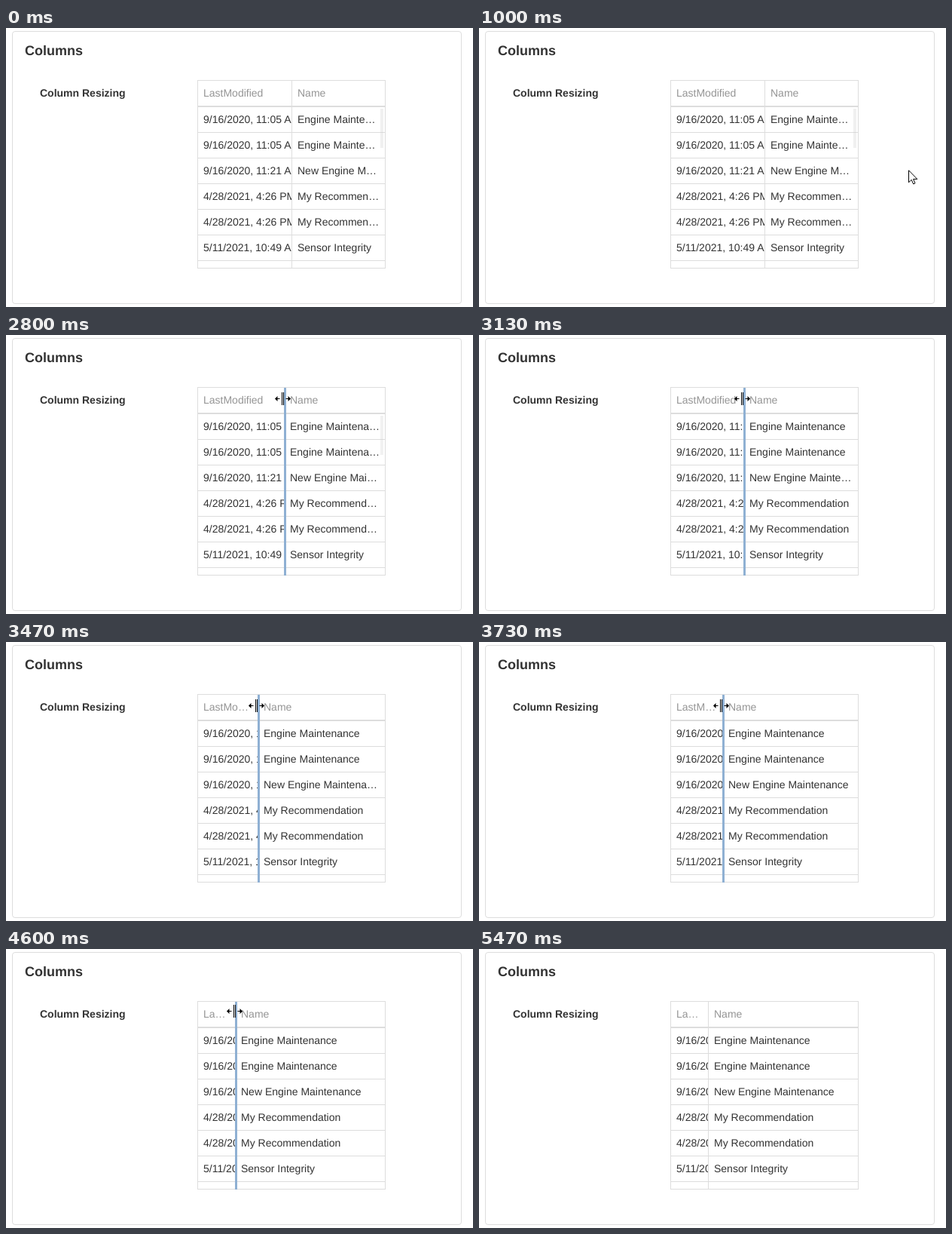
These frames come from a looping animation (620 px wide and 370 px high, 5790 ms). An HTML page:

```html
<!DOCTYPE html>
<html lang="en">
<head>
<meta charset="utf-8">
<title>Column Resizing</title>
<style>
html, body { margin: 0; width: 100%; height: 100%; overflow: hidden; background: #fff; }
#stage {
  position: absolute; left: 0; top: 0; width: 620px; height: 370px; overflow: hidden;
  font: 14px/20px Arial, "Liberation Sans", sans-serif; color: #333;
  text-rendering: geometricPrecision;
}
#stage div, #stage svg { position: absolute; box-sizing: border-box; white-space: nowrap; }
.card { left: 8px; top: 4px; width: 597px; height: 362px; border: 1px solid #ddd; border-radius: 4px; }
.title { left: 25px; top: 20px; font-size: 18px; font-weight: bold; }
.label { left: 45px; top: 76px; font-weight: bold; }
.grid { left: 254px; top: 69px; width: 250px; height: 250px; border: 1px solid #ddd; }
.rule { left: 254px; width: 250px; height: 1px; background: #ddd; }
.cell { overflow: hidden; height: 20px; }
.dots { text-overflow: ellipsis; }
.head { color: #959595; }
#split { top: 69px; width: 1px; height: 250px; background: #ddd; }
#guide { top: 70px; width: 3px; height: 249px; background: #8fb0d3; }
#thumb { left: 497px; top: 107px; width: 4px; height: 52px; background: #c8c8c8; }
</style>
</head>
<body>
<div id="stage">
  <div class="card"></div>
  <div class="title">Columns</div>
  <div class="label">Column Resizing</div>
  <div class="grid"></div>
  <div id="split"></div>
  <div id="thumb"></div>
  <div id="guide"></div>
  <svg width="620" height="370" viewBox="0 0 620 370">
    <g id="arrow" fill="#fff" stroke="#000" stroke-linejoin="round">
      <path d="M.5 .5V16.5L4.2 13 6.7 18.6 9 17.6 6.6 12.1H11.8Z"/>
    </g>
    <g id="hand" fill="#fff" stroke="#000" stroke-width="1.2" stroke-linejoin="round">
      <path d="M-1.5 12V1.8a1.5 1.5 0 0 1 3 0V8q1.6-1.1 3 .3 1.7-.9 3 .6 1.8-.5 2 1.1V15.5q0 2-1.5 4V22.5H0V20.3Q-2 17.8-3.5 15L-6 12.2Q-6.5 10.4-4.7 10.2-3 10.5-1.5 12Z"/>
      <path d="M1.5 8V11.5M4.5 8.5V11.5M7.5 9V11.5" fill="none" stroke-width="1"/>
    </g>
    <g id="resize">
      <path d="M-3-8.5H1V8.5H-3Z" fill="#fff"/>
      <path d="M-2-8.5h1v17h-1zM0-8.5h1v17h-1zM-11 0l3.5-3.5v3h3v1h-3v3zM10 0l-3.5-3.5v3h-3v1h3v3z"/>
    </g>
  </svg>
</div>
<script>
const LOOP = 5790, FPS = 15, LEFT = 262, RIGHT = 497, PAD = 8, ROW = 34;
const PRESS = 2520, PULL = 2600, RELEASE = 4900, GONE = 5460;
const $ = id => document.getElementById(id);

const mix = (a, b, k) => a + (b - a) * k;
const ramp = (t, from, to) => Math.min(1, Math.max(0, (t - from) / (to - from)));
const easeOut = (k, power) => 1 - (1 - k) ** power;

const records = [
  ["9/16/2020, 11:05 AM", "Engine Maintenance"],
  ["9/16/2020, 11:05 AM", "Engine Maintenance"],
  ["9/16/2020, 11:21 AM", "New Engine Maintenance"],
  ["4/28/2021, 4:26 PM", "My Recommendation"],
  ["4/28/2021, 4:26 PM", "My Recommendation"],
  ["5/11/2021, 10:49 AM", "Sensor Integrity"]
];

// The drag slows down towards its end: [time, column edge]
const drag = [[PULL, 379], [3470, 334], [3800, 320], [4200, 311], [4600, 304]];

function edge(t) {
  let x = drag[0][1];
  for (let i = 1; i < drag.length; i++) {
    const [t0, x0] = drag[i - 1], [t1, x1] = drag[i];
    x += (x1 - x0) * ramp(t, t0, t1);
  }
  return Math.round(x);
}

function pointer(t) {
  if (t < 1470) {
    const k = easeOut(ramp(t, 930, 1470), 1.6);
    return [mix(612, 400, k), mix(210, 101, k)];
  }
  if (t < PULL) {
    const k = ramp(t, 1470, 2070);
    return [mix(400, 380, k), mix(101, 84.5, easeOut(k, 3))];
  }
  if (t < RELEASE) {
    const k = ramp(t, 3730, 4200);
    return [edge(t) - 1 + k, 84.5 - 2 * k];
  }
  const k = ramp(t, RELEASE, 5400) ** 1.5;
  return [mix(304, 4, k), mix(82.5, 355, k)];
}

function cursorKind(t, y) {
  if (t < 920 || t > GONE) return "";
  if (t > 1980 && t < RELEASE) return "resize";
  return t < PULL && y < 104 ? "hand" : "arrow";
}

function box(cls, top, text = "") {
  const el = document.createElement("div");
  el.className = cls;
  el.style.top = top + "px";
  el.textContent = text;
  $("stage").insertBefore(el, $("split"));
  return el;
}

function span(el, from, to) {
  el.style.left = from + "px";
  el.style.width = to - from + "px";
}

function show(el, on) {
  el.style.display = on ? "" : "none";
}

const title = box("cell dots head", 76, "LastModified");
const dates = [], names = [box("cell dots head", 76, "Name")];
box("rule", 103).style.height = "2px";
records.forEach(([date, name], i) => {
  const y = 105 + i * ROW;
  dates.push(box("cell", y + 6, date));
  names.push(box("cell dots", y + 6, name));
  box("rule", y + ROW - 1);
});

function draw(ms) {
  // Step like a 15 fps screen capture
  const t = Math.floor((ms + 4) * FPS / 1000) * 1000 / FPS;
  const x = edge(t);
  span(title, LEFT, x - PAD);
  dates.forEach(el => span(el, LEFT, x));
  names.forEach(el => span(el, x + PAD, RIGHT));
  $("split").style.left = $("guide").style.left = x + "px";
  show($("guide"), t > PRESS && t < RELEASE);
  $("thumb").style.opacity = mix(.27, 1, ramp(t, 1130, 1270)) - ramp(t, PULL, 2870);

  const [px, py] = pointer(t);
  const kind = cursorKind(t, py);
  for (const id of ["arrow", "hand", "resize"]) show($(id), id === kind);
  if (kind) $(kind).setAttribute("transform", `translate(${Math.round(px)} ${py})`);
}

const start = performance.now();
function tick() {
  draw((performance.now() - start) % LOOP);
  requestAnimationFrame(tick);
}
draw(0);
requestAnimationFrame(tick);
</script>
</body>
</html>
```
